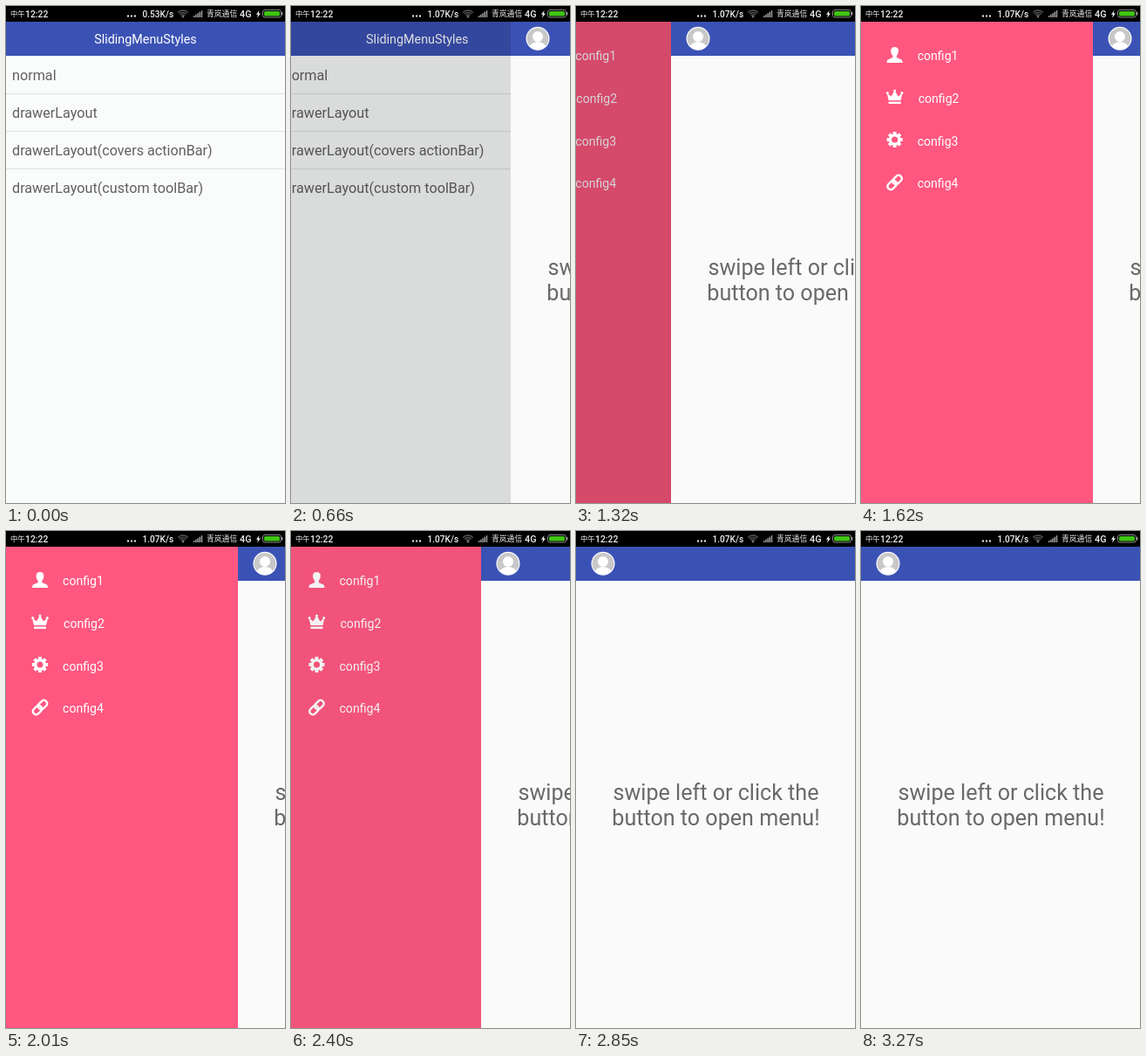
These frames come from a looping animation (320x569 px, 3.51 s). An HTML page with a canvas:

```html
<!DOCTYPE html>
<html lang="en">
<head>
<meta charset="utf-8">
<title>Sliding menu</title>
<style>
  html, body { margin: 0; width: 100%; height: 100%; overflow: hidden; background: #000; }
  canvas { display: block; width: 320px; height: 569px; }
</style>
</head>
<body>
<canvas id="stage" width="320" height="569"></canvas>
<script>
const g = document.getElementById('stage').getContext('2d');
const W = 320, H = 569, TOP = 18, BAR = 57, MENU = 266, LOOP = 3510;
const BLUE = '#3b52b5';
const SANS = 'Roboto, sans-serif', CJK = '"Noto Sans CJK SC", "Noto Sans CJK", sans-serif';

const clamp = v => Math.max(0, Math.min(1, v));
const smooth = v => (1 - Math.cos(Math.PI * clamp(v))) / 2;

// Left edge of the page while it slides in over the list
const pageX = t => Math.round(W * Math.pow(1 - clamp((t - 588) / 495), 1.5));
// Left edge of the page while the menu opens and closes
const menuX = t => Math.round(MENU * (smooth((t - 1100) / 500) - smooth((t - 2262) / 500)));

function rect(x, y, w, h, color) {
  g.fillStyle = color;
  g.fillRect(x, y, w, h);
}

function disc(x, y, r, color) {
  g.fillStyle = color;
  g.beginPath();
  g.arc(x, y, r, 0, 7);
  g.fill();
}

function text(str, x, y, size, color, align = 'left', font = SANS, weight = 400) {
  g.font = `${weight} ${size}px ${font}`;
  g.textAlign = align;
  g.fillStyle = color;
  g.fillText(str, x, y);
}

function at(x, y, draw) {
  g.save();
  g.translate(x, y);
  draw();
  g.restore();
}

function fillPath(d, color) {
  g.fillStyle = color;
  g.fill(new Path2D(d));
}

function list() {
  rect(0, TOP, W + 80, H, '#fafbfb');
  rect(0, TOP, W + 80, BAR - TOP, BLUE);
  text('SlidingMenuStyles', 160, 43, 14.35, '#fff', 'center');
  ['normal', 'drawerLayout', 'drawerLayout(covers actionBar)', 'drawerLayout(custom toolBar)']
    .forEach((row, i) => {
      text(row, 7, 85 + i * 43, 16.2, '#606060');
      if (i < 3) rect(0, 100 + i * 43, W + 80, 1, '#dfe2e2');
    });
}

const icons = [
  () => fillPath('M0-9C6-9 5-2 2.3 1V3L8 5.5Q9 6 9 9H-9Q-9 6-8 5.5L-2.3 3V1C-5-2-6-9 0-9Z', '#fff'),
  () => {
    fillPath('M-9-4L-4 0L0-7L4 0L9-4L7 4.5H-7ZM-7 6H7V8.5H-7Z', '#fff');
    [[-8.3, -4], [0, -6.5], [8.3, -4]].forEach(p => disc(...p, 1.5, '#fff'));
  },
  () => {
    for (let i = 0; i < 8; i++) {
      rect(-2, -9, 4, 4, '#fff');
      g.rotate(Math.PI / 4);
    }
    g.strokeStyle = '#fff';
    g.lineWidth = 3.2;
    g.beginPath();
    g.arc(0, 0, 5.2, 0, 7);
    g.stroke();
  },
  () => {
    g.rotate(-Math.PI / 4);
    g.strokeStyle = '#fff';
    g.lineWidth = 2.4;
    g.beginPath();
    g.roundRect(-10, -3.7, 11.5, 7.4, 3.5);
    g.roundRect(-1.5, -3.7, 11.5, 7.4, 3.5);
    g.stroke();
  }
];

function menu() {
  icons.forEach((icon, i) => {
    at(39, [56, 103.5, 153, 202][i], icon);
    text('config' + (i + 1), i === 1 ? 66 : 65, 62.3 + i * 48.6, 14.1, '#fff');
  });
}

function avatar() {
  disc(31, 37.3, 13.5, '#fff');
  disc(31, 37.3, 12.4, '#c8c8c8');
  g.save();
  g.beginPath();
  g.arc(31, 37.3, 12.8, 0, 7);
  g.clip();
  disc(31, 35, 6, '#fff');
  g.beginPath();
  g.ellipse(31, 48.5, 9.8, 7.5, 0, 0, 7);
  g.fill();
  g.restore();
}

function page() {
  rect(0, TOP, W, H, '#fafafa');
  rect(0, TOP, W, BAR - TOP, BLUE);
  avatar();
  text('swipe left or click the', 160.5, 308, 25.1, '#696969', 'center');
  text('button to open menu!', 160.5, 337, 25.1, '#696969', 'center');
}

function status(t) {
  const ink = '#f0f0f0';
  const label = (str, x, y, size, font) => text(str, x, y, size, ink, 'left', font, 500);
  rect(0, 0, W, TOP, '#000');
  label('中午', 5, 12.3, 8.4, CJK);
  label('12:22', 22, 13, 10.4);
  for (let i = 0; i < 3; i++) rect(139 + i * 4, 10.5, 2, 2, ink);
  label(t < 300 ? '0.53K/s' : '1.07K/s', 156.5, 13, 10.1);
  g.strokeStyle = '#555';
  g.lineWidth = 1.4;
  for (let r = 3; r < 9; r += 2.5) {
    g.beginPath();
    g.arc(203, 13, r, -Math.PI * 0.76, -Math.PI * 0.24);
    g.stroke();
  }
  disc(203, 12.3, 1.2, '#777');
  for (let i = 0; i < 5; i++) rect(215 + i * 2.2, 11.2 - i * 1.5, 1.4, 1.8 + i * 1.5, '#aaa');
  label('青岚通信', 230, 12.4, 8.8, CJK);
  label('4G', 268, 13, 10.8);
  fillPath('M290.5 5L287 9.7H289L288 13.5L292 8.5H289.8Z', ink);
  g.strokeStyle = '#8a8a8a';
  g.lineWidth = 1;
  g.beginPath();
  g.roundRect(294.5, 4.5, 21, 8.5, 2.5);
  g.stroke();
  rect(316, 7, 1.5, 3.5, '#8a8a8a');
  g.fillStyle = '#3fc414';
  g.beginPath();
  g.roundRect(296, 6, 18, 5.5, 1.5);
  g.fill();
}

function draw(t) {
  const enter = pageX(t), open = menuX(t), lagged = menuX(t - 36);
  if (enter > 0) {
    const p = 1 - enter / W;
    at(-72 * p, 0, list);
    rect(0, TOP, enter, H, `rgba(0,0,0,${0.61 * p})`);
  } else {
    rect(0, TOP, W, H, '#ff5780');
    at((lagged - MENU) * 0.353, 0, menu);
    rect(0, TOP, open, H, `rgba(0,0,0,${0.28 * (1 - open / MENU)})`);
  }
  at(enter || open, 0, page);
  status(t);
}

const start = performance.now();
function tick() {
  draw((performance.now() - start) % LOOP);
  requestAnimationFrame(tick);
}
tick();
</script>
</body>
</html>
```
